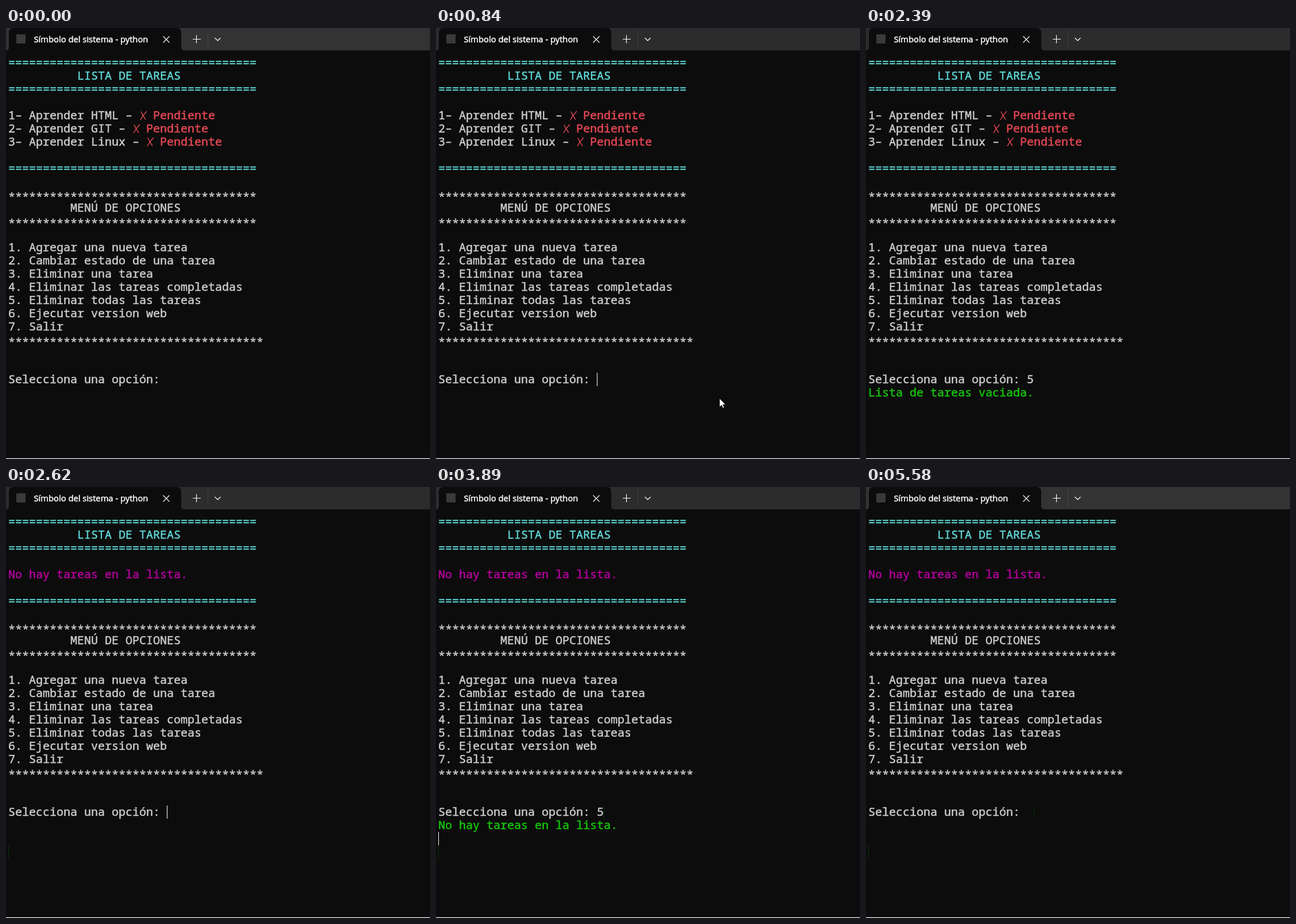
Recreate the animation shown at these times as an HTML page with a canvas. Size 738x751 px, loop 5670 ms.

```html
<!DOCTYPE html>
<html lang="es">
<head>
<meta charset="utf-8">
<title>Lista de tareas</title>
<style>
  html, body { margin: 0; width: 100%; height: 100%; overflow: hidden; background: #0c0c0c; }
  canvas { display: block; }
</style>
</head>
<body>
<canvas id="stage" width="738" height="751"></canvas>
<script>
const ctx = document.getElementById('stage').getContext('2d');
const LOOP = 5670, BLINK = 370, BLUR = 5580;
const LEFT = 4, TOP = 49, CELL_W = 12, CELL_H = 23;
const MONO = '20px "Noto Sans Mono", "DejaVu Sans Mono", monospace';
const SANS = '14.75px "Open Sans", "Noto Sans", sans-serif';
const COLOR = {
  back: '#0c0c0c', text: '#cccccc', cyan: '#61d6d6', red: '#e74856',
  green: '#16c60c', magenta: '#b4009e', ghost: '#0c300c', white: '#ffffff'
};

const TASKS = ['HTML', 'GIT', 'Linux'];
const NO_TASKS = 'No hay tareas en la lista.';
const OPTIONS = [
  'Agregar una nueva tarea', 'Cambiar estado de una tarea', 'Eliminar una tarea',
  'Eliminar las tareas completadas', 'Eliminar todas las tareas',
  'Ejecutar version web', 'Salir'
];

// Starts of the steps, which repeat as: prompt, key typed, answer
const STEPS = [480, 1200, 1980, 2620, 3480, 3890, 4570];

const cellX = col => LEFT + CELL_W * col;
const cellY = row => TOP + CELL_H * row;
const progress = (t, from, to) => Math.min(1, Math.max(0, (t - from) / (to - from)));

function rect(color, x, y, w, h) {
  ctx.fillStyle = color;
  ctx.fillRect(x, y, w, h);
}

function stroke(color, width, path) {
  ctx.strokeStyle = color;
  ctx.lineWidth = width;
  ctx.stroke(new Path2D(path));
}

// A fine outline gives the letters their medium weight
function write(text, x, y, font, color) {
  ctx.font = font;
  ctx.fillStyle = ctx.strokeStyle = color;
  ctx.lineWidth = 0.5;
  ctx.lineJoin = 'round';
  ctx.fillText(text, x, y);
  ctx.strokeText(text, x, y);
}

function print(col, row, text, color = COLOR.text, dy = 0) {
  write(text, cellX(col), cellY(row) + 18 + dy, MONO, color);
}

const rule = row => print(0, row, '='.repeat(36), COLOR.cyan);
const stars = (row, count) => print(0, row, '*'.repeat(count), COLOR.text, 4);
const bar = (color, col, row) => rect(color, cellX(col), cellY(row), 1, CELL_H);

function drawTitleBar(focused) {
  rect(focused ? '#2c2c2c' : '#333333', 0, 0, 738, 39);
  ctx.fillStyle = COLOR.back;
  ctx.fill(new Path2D('M0 39Q5 39 5 33V8Q5 0 13 0H297Q305 0 305 8V33Q305 39 311 39Z'));
  rect('#3a3a3a', 18, 11, 16, 16);
  write('Símbolo del sistema - python', 48.5, 25, SANS, COLOR.white);
  stroke(COLOR.white, 1.2, 'M273.5 14.5L284.5 25.5M284.5 14.5L273.5 25.5');
  stroke(COLOR.white, 1.2, 'M325 19.5H339M331.5 12.5V26.5M363.5 17.3L368.5 22L373.5 17.3');
  stroke('rgba(255, 255, 255, 0.1)', 1, 'M351.5 4V34');
}

function drawTask(name, index) {
  const row = 4 + index;
  const label = `${index + 1}– Aprender ${name} – `;
  const x = cellX(label.length), y = cellY(row);
  print(0, row, label);
  stroke(COLOR.red, 1.4, `M${x + 13} ${y + 4}Q${x + 6} ${y + 11} ${x + 2} ${y + 19}` +
    `M${x + 3} ${y + 4.5}Q${x + 6} ${y + 12} ${x + 11} ${y + 18.5}`);
  print(label.length + 2, row, 'Pendiente', COLOR.red);
}

function drawMenu(row) {
  rule(row);
  stars(row + 2, 36);
  print(9, row + 3, 'MENÚ DE OPCIONES');
  stars(row + 4, 36);
  OPTIONS.forEach((option, i) => print(0, row + 6 + i, `${i + 1}. ${option}`));
  stars(row + 13, 37);
  print(0, row + 16, 'Selecciona una opción:');
}

function drawCaret(age, cleared, col, row) {
  const lit = cleared ? 140 : 410;
  const blinks = Math.ceil((age - lit + 1) / BLINK);
  if (age < lit || blinks % 2 === 0) bar(COLOR.white, col, row);
}

function drawScreen(t) {
  const step = STEPS.filter(start => start <= t).length - 1;
  const emptied = step >= 3;
  const typed = step % 3 > 0, answered = step % 3 === 2;
  const menuRow = emptied ? 6 : 8, promptRow = menuRow + 16;

  rule(0);
  print(10, 1, 'LISTA DE TAREAS', COLOR.cyan);
  rule(2);
  if (emptied) print(0, 4, NO_TASKS, COLOR.magenta);
  else TASKS.forEach(drawTask);
  drawMenu(menuRow);
  if (typed) print(23, promptRow, '5');
  if (answered) print(0, promptRow + 1, emptied ? NO_TASKS : 'Lista de tareas vaciada.', COLOR.green);

  // faint traces left behind by the caret
  if (step >= 2) bar(COLOR.ghost, 0, 25);
  if (step >= 5) bar(COLOR.ghost, 24, 22);

  if (step < 0) return;
  const col = answered ? 0 : typed ? 24 : 23;
  drawCaret(t - STEPS[step], emptied && !typed, col, promptRow + (answered ? 2 : 0));
}

// The pointer glides in, rests, hides while typing and darts away
function drawPointer(t) {
  const visible = t >= 90 && t < 1200 || t >= 1520 && t < 1930 || t >= 4660 && t < 5080;
  if (!visible) return;
  const away = (1 - progress(t, 90, 340)) ** 2;
  const drift = progress(t, 570, 840);
  const leave = progress(t, 4660, 5080) ** 4;
  ctx.save();
  ctx.translate(Math.round(490 + 113 * away + 3 * drift + 60 * leave),
    Math.round(651 + 75 * away - 6 * drift + 18 * leave));
  const arrow = 'M.5 .5V15.5L4 12.2L6.3 17.3L8.6 16.3L6.4 11.3H11Z';
  ctx.fillStyle = COLOR.white;
  ctx.fill(new Path2D(arrow));
  stroke('#000000', 0.7, arrow);
  ctx.restore();
}

function draw(t) {
  rect(COLOR.back, 0, 0, 738, 751);
  drawTitleBar(t >= STEPS[0] && t < BLUR);
  drawScreen(t);
  rect('#484848', 0, 749, 738, 1);
  rect('#f0f0f0', 0, 750, 738, 1);
  drawPointer(t);
}

const start = performance.now();
function tick() {
  draw((performance.now() - start) % LOOP);
  requestAnimationFrame(tick);
}
tick();
</script>
</body>
</html>
```
